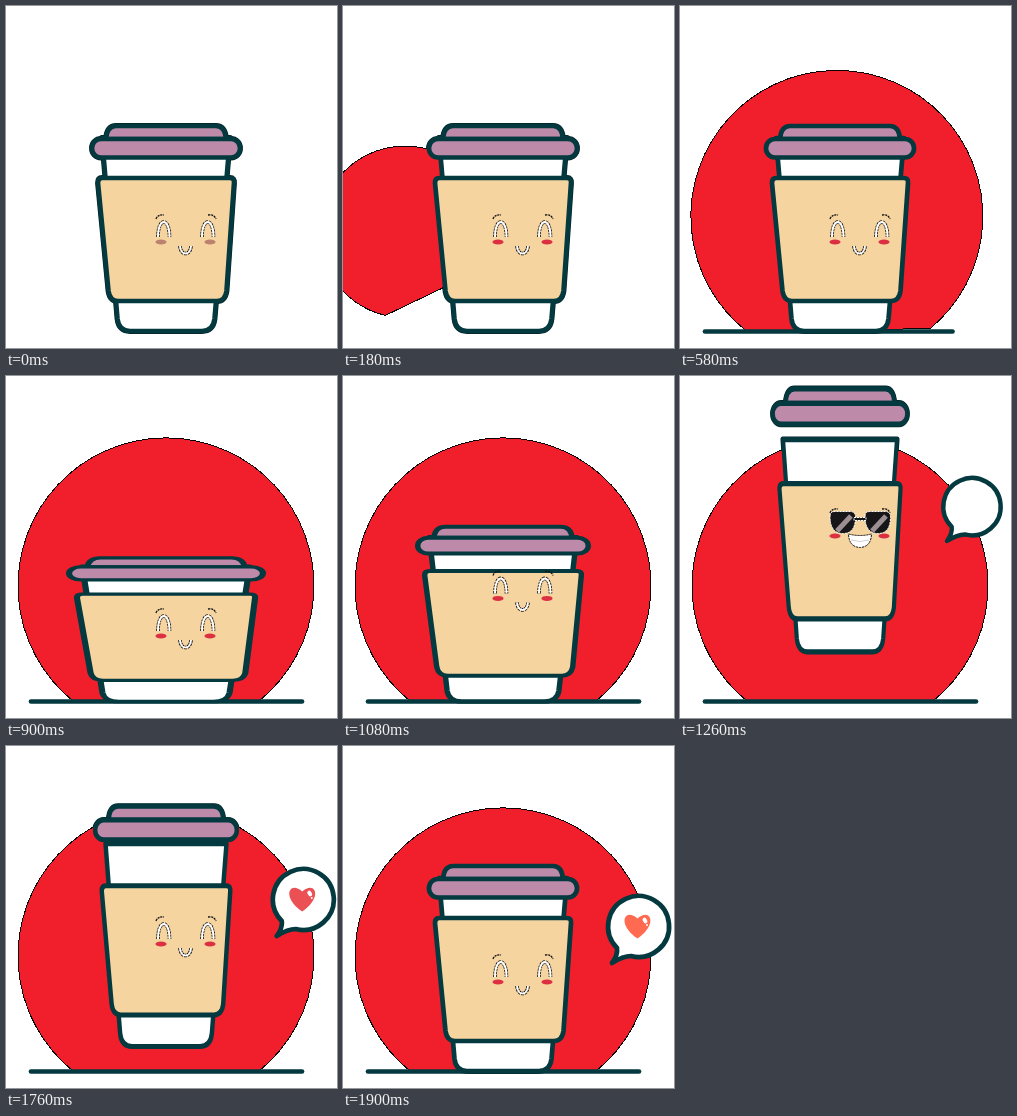
Animation, 331 px wide and 342 px high, one loop 1.92 s. Source, as an HTML page:

```html
<!DOCTYPE html>
<html lang="en">
<head>
<meta charset="utf-8">
<title>Happy coffee cup</title>
<style>
  html, body { margin: 0; width: 100%; height: 100%; overflow: hidden; background: #fff; }
  svg { display: block; }
  .ink { stroke: #03393f; stroke-width: 4.7; stroke-linejoin: round; stroke-linecap: round; }
  .fringe { stroke: #022429; stroke-width: 5.8; stroke-linejoin: round; }
  .dash { fill: none; stroke: #111; stroke-dasharray: 2.2 .8; }
  .line { stroke-width: 3.6; }
  .white { fill: none; stroke: #fff; stroke-width: 2; }
</style>
</head>
<body>
<svg width="331" height="342" viewBox="0 0 331 342">
  <defs>
    <g id="body">
      <path fill="#fff" d="M96 132H224L208.500 313Q207 325 196 325H124Q113 325 111.500 313Z"/>
      <path fill="#f5d49f" d="M96 172H224Q228.500 172 228 177L220.500 285Q219 295 211 295H112Q104 295 102.500 285L92 177Q92 172 96 172Z"/>
    </g>
    <g id="lid" fill="#bd8aa9">
      <path d="M100 133Q101 120 110 120H210Q219 120 220 133Z"/>
      <rect x="86" y="133" width="148" height="18.500" rx="9"/>
    </g>
    <path id="eyes" d="M152 231C152 211 163.500 211 163.500 231M196 231C196 211 207.500 211 207.500 231"/>
    <path id="smile" d="M174 240C174.500 250 184.500 250 185 240"/>
    <path id="lens" d="M150 216Q150 211.500 155 211.500H170Q175.500 211.500 175.500 217Q175.500 233.500 163 233.500Q150 233.500 150 216Z"/>
  </defs>

  <use class="fringe" data-part="body" href="#body"/>
  <use class="fringe" data-part="lid" href="#lid"/>
  <path id="sun" fill="#f01f2b" stroke="#0c0203" vector-effect="non-scaling-stroke" shape-rendering="crispEdges"
        d="M-93 115A148 148 0 1 1 93 115Z"/>
  <path id="ground" class="ink"/>
  <use class="ink" data-part="body" href="#body"/>
  <use class="ink" data-part="lid" href="#lid"/>

  <g id="face">
    <path class="dash" stroke-width="1.300" d="M150 213Q152 208 158 209M202 209Q208 208 210 213"/>
    <g id="cheeks">
      <ellipse cx="155" cy="236" rx="5.500" ry="2.500"/>
      <ellipse cx="204" cy="236" rx="5.500" ry="2.500"/>
    </g>
    <g data-mood="happy">
      <use class="dash line" href="#eyes"/>
      <use class="white" href="#eyes"/>
      <use class="dash line" href="#smile"/>
      <use class="white" href="#smile"/>
    </g>
    <g data-mood="cool">
      <g fill="#161517" stroke="#fff" stroke-width="1" stroke-dasharray="2 1">
        <use href="#lens"/>
        <use href="#lens" x="35"/>
        <path d="M174 217.500H186V220.500H174Z"/>
      </g>
      <path fill="none" stroke="#9c8f91" stroke-width="5" d="M157 231L171 216M192 231L206 216"/>
      <path fill="#fff" stroke="#111" stroke-dasharray="2.200 .8" d="M168.500 234Q180 237 191.500 234Q191 247 180 247.500Q169 247 168.500 234Z"/>
      <path stroke="#bbb" stroke-width=".7" fill="none" d="M171 240Q180 243 189 240"/>
    </g>
    <g data-mood="wow">
      <g fill="#fff" stroke="#111" stroke-dasharray="2.200 .8">
        <ellipse cx="159" cy="224" rx="6.800" ry="7.500"/>
        <ellipse cx="201.500" cy="224" rx="6.800" ry="7.500"/>
        <rect x="174.500" y="229.500" width="12.500" height="21" rx="4"/>
      </g>
      <rect x="175.500" y="230.500" width="10.500" height="19" rx="3" fill="#d6365a"/>
      <g fill="none" stroke="#555" stroke-width=".8">
        <ellipse cx="159" cy="224" rx="4.800" ry="5.500"/>
        <ellipse cx="201.500" cy="224" rx="4.800" ry="5.500"/>
      </g>
      <path stroke="#fff" stroke-width="3" d="M153 230V245"/>
      <path stroke="#181818" stroke-width="1.500" d="M155 231V244"/>
    </g>
  </g>

  <g id="bubble">
    <path class="ink" fill="#fff" d="M269 148A30.500 30.500 0 1 1 283 156Q275 156 264 163Q270 155 269 148Z"/>
    <g id="heart">
      <path d="M289.500 138.500C268 124 277 107 289.500 118.500C302 107 311 124 289.500 138.500Z"/>
      <ellipse cx="297" cy="120.500" rx="2" ry="3" fill="#fff" transform="rotate(-30 297 120.500)"/>
      <circle cx="299" cy="125" r="1" fill="#fff"/>
    </g>
  </g>
</svg>
<script>
const LOOP = 1920, STEP = 20;
const el = id => document.getElementById(id);
const set = (node, name, value) => node.setAttribute(name, value);
const move = (node, value) => set(node, 'transform', value);
const clamp = u => Math.min(1, Math.max(0, u));
const easeOut = (u, power) => 1 - (1 - clamp(u)) ** power;
const mix = (a, b, u) => `rgb(${a.map((v, i) => v + (b[i] - v) * u)})`;

// Smooth interpolation through [time, value] pairs
function track(t, ...keys) {
  if (t <= keys[0][0]) return keys[0][1];
  for (let i = 1; i < keys.length; i++) {
    const [t0, a] = keys[i - 1], [t1, b] = keys[i];
    if (t < t1) {
      const u = (t - t0) / (t1 - t0);
      return a + (b - a) * u * u * (3 - 2 * u);
    }
  }
  return keys[keys.length - 1][1];
}

function drawScene(t) {
  const rest = 1 - easeOut(t / 820, 3.5);
  move(el('sun'), `translate(${160 - 233 * rest} ${210 + 38 * rest}) rotate(${-61 * rest}) scale(${1 - rest})`);
  set(el('ground'), 'd', `M25 325.500H${25 + 271 * easeOut((t - 400) / 323, 3)}`);
  set(el('ground'), 'visibility', t > 400 ? 'visible' : 'hidden');
}

function drawCup(t) {
  const pose = (rest, squash, stretch) => track(t, [600, rest], [900, squash], [980, squash],
    [1220, stretch], [1640, stretch], [1880, rest]);
  const sx = pose(1, 1.31, .89), sy = pose(1, .7, 1.1);
  const foot = track(t, [1080, 326], [1240, 277], [1640, 277], [1880, 326]);
  const pop = track(t, [1080, 0], [1240, -37], [1639, -37], [1640, -49], [1880, 0]);
  const parts = {
    body: `translate(160 ${foot}) scale(${sx} ${sy}) translate(-160 -326)`,
    lid: `translate(160 ${foot - 173 * sy + pop}) scale(${sx - pop * .0005} ${sy - pop * .0005}) translate(-160 -153)`
  };
  document.querySelectorAll('[data-part]').forEach(n => move(n, parts[n.dataset.part]));

  move(el('face'), `translate(0 ${pose(0, 24, -76)})`);
  set(el('cheeks'), 'fill', mix([188, 130, 112], [220, 48, 66], clamp(t / 140)));
  const mood = t < 1140 || t >= 1760 ? 'happy' : t < 1640 ? 'cool' : 'wow';
  document.querySelectorAll('[data-mood]').forEach(n =>
    set(n, 'visibility', n.dataset.mood === mood ? 'visible' : 'hidden'));
}

function drawBubble(t) {
  const size = track(t, [1140, 0], [1260, .94], [1360, 1]);
  const settle = track(t, [1260, 1], [1360, 0]);
  const x = 3 * settle + track(t, [1640, 0], [1800, 8], [1900, 5]);
  const y = 2 * settle + track(t, [1640, 0], [1880, 54]);
  move(el('bubble'), `translate(${264 + x} ${163 + y}) scale(${size}) translate(-264 -163)`);
  set(el('bubble'), 'visibility', size > 0 ? 'visible' : 'hidden');

  const beat = track(t, [1300, 0], [1460, 1.12], [1580, 1]);
  move(el('heart'), `translate(290 126) scale(${beat}) translate(-290 -126)`);
  set(el('heart'), 'fill', mix([214, 54, 90], [255, 106, 80], track(t, [1640, 0], [1880, 1])));
}

function frame(now) {
  const t = Math.floor(now % LOOP / STEP) * STEP;
  drawScene(t);
  drawCup(t);
  drawBubble(t);
  requestAnimationFrame(frame);
}
frame(performance.now());
</script>
</body>
</html>
```
